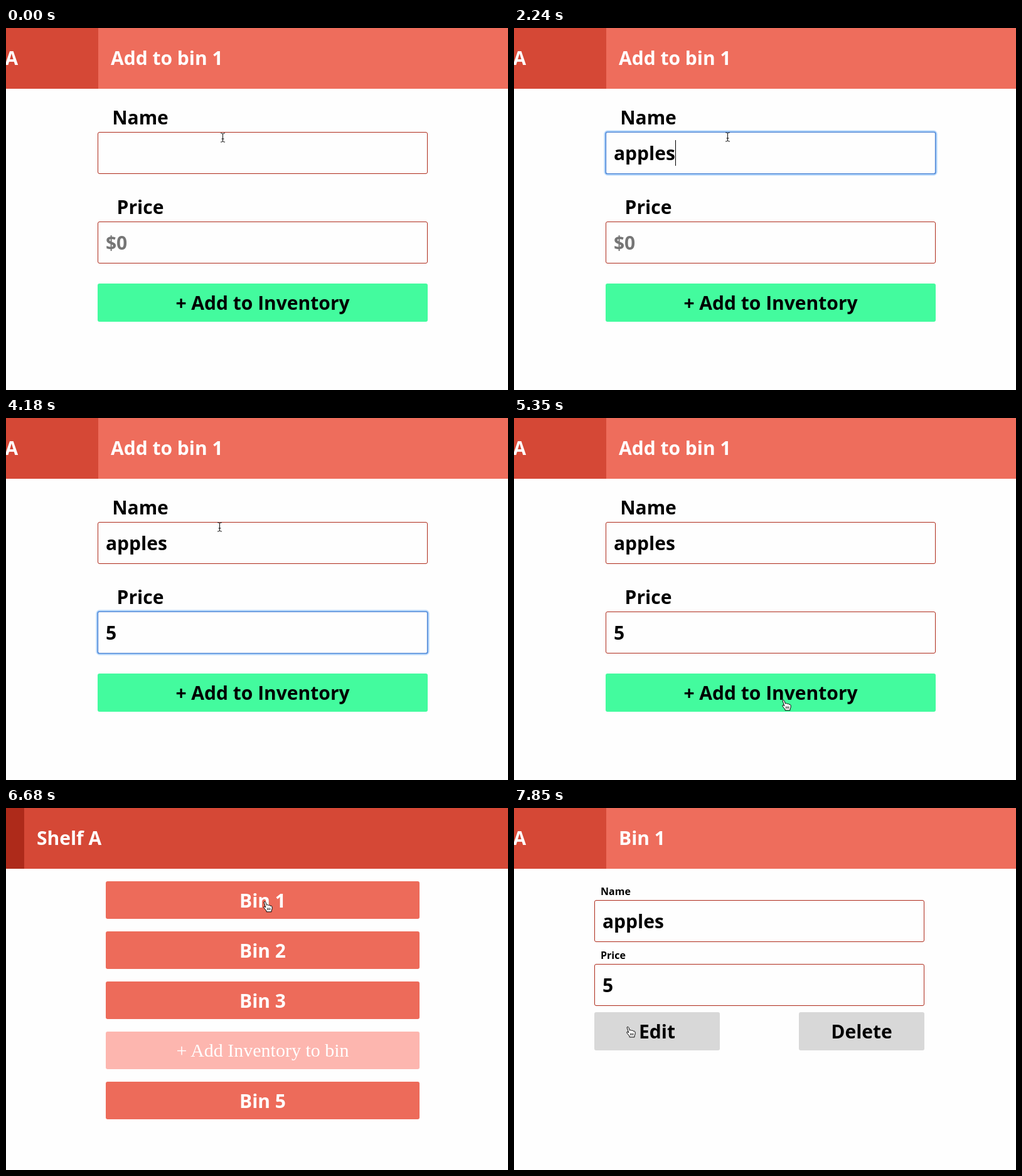
Recreate the animation shown at these times as an HTML page. Size 800 px wide and 578 px high, loop 8000 ms.

```html
<!DOCTYPE html>
<html lang="en">
<head>
<meta charset="utf-8">
<title>Shelf inventory</title>
<style>
html, body { margin: 0; width: 100%; height: 100%; overflow: hidden; background: #fefefe; }
svg { display: block; width: 800px; height: 578px; }
text { font: 700 30px "Open Sans", "Noto Sans", sans-serif; }
.small { font-size: 16px; }
.serif { font: 400 30px "Liberation Serif", serif; }
</style>
</head>
<body>
<svg id="stage" viewBox="0 0 800 578"></svg>
<script>
const LOOP = 8000;
const DARK = '#ae2a1a', RED = '#d54836', CORAL = '#ee6d5c';
const stage = document.getElementById('stage');

// Pointer samples: time, shape, hot spot x, hot spot y
const POINTER = [
  [0, 'beam', 345.5, 175], [300, 'beam', 340.5, 174],
  [4320, 'beam', 342.5, 173], [4470, 'beam', 350.5, 182], [4620, 'beam', 372.5, 226],
  [4770, 'beam', 402.5, 318], [4910, 'arrow', 420, 393], [5060, 'hand', 430, 438],
  [5200, 'hand', 432, 450], [5500, 'arrow', 432, 448],
  [5650, 'hand', 432, 444], [5790, 'arrow', 431, 424], [5940, 'hand', 428, 365],
  [6090, 'hand', 422, 282], [6230, 'hand', 418, 206], [6380, 'hand', 416, 164],
  [6530, 'hand', 415, 151], [6680, 'hand', 415, 149], [6820, 'arrow', 415, 149],
  [6970, 'arrow', 416, 152], [7120, 'arrow', 428, 186], [7260, 'arrow', 456, 262],
  [7410, 'hand', 485, 340], [7550, 'hand', 496, 375],
  [7700, 'arrow', 330, 367], [7850, 'hand', 184, 349]
];
const LETTERS = [1340, 1640, 1790, 1940, 2090, 2240];
const CARET_TOGGLES = [300, 750, 1200, 3130, 3580, 4180, 4620, 5060];
const TIMES = [...new Set([...POINTER.map(p => p[0]), ...LETTERS, ...CARET_TOGGLES,
  2540, 3730, 5350])].sort((a, b) => a - b);

const GLYPHS = {
  beam: `<path d="M-3.5-7h1.5Q0-7 0-5V5Q0 7-2 7h-1.5M3.5-7H2Q0-7 0-5M0 5Q0 7 2 7h1.5M-2 2h4"
    fill="none" stroke="#111"/>`,
  arrow: `<path d="M0 0V14.6L3.3 11.5 5.8 17.2 8.2 16.2 5.8 10.6H10.3Z" stroke="#fff" stroke-width="1.2"/>`,
  hand: `<path d="M-2 9V2Q-2.1.6-.8.5.5.6.7 2L1.5 6Q2.2 4.8 3.5 5.5L4 6.3Q5.2 5.3 6.3 6.6L6.6 7.4Q9-
    6.8 9 7Z" fill="none"/>
    <path d="M-3.8 2Q-4.2.5-2.8.4-1.7.4-1.2 1.7L.5 6.2Q1.2 5 2.7 5.7L3.4 6.6Q4.5 5.6 5.8 6.6L6.3 7.4
    Q8.4 6.5 9 8.6 9.8 12 8 14.8V16.8H0V15.2L-3 11.6Q-4.8 9.5-4 8.6-2.8 7.8-1.2 9.8Z"
    fill="#fff" stroke="#000" stroke-linejoin="round"/>
    <path d="M1.6 10.5v3.6M3.7 10.5v3.6M5.8 10.5v3.6" stroke="#000" stroke-width=".9"/>`
};
GLYPHS.hand = GLYPHS.hand.slice(GLYPHS.hand.indexOf('<path', 1));

const box = (x, y, w, h, fill, r = 0) =>
  `<rect x="${x}" y="${y}" width="${w}" height="${h}" rx="${r}" fill="${fill}"/>`;
const label = (s, x, y, { fill = '#000', anchor = 'start', cls = '' } = {}) =>
  `<text x="${x}" y="${y}" fill="${fill}" text-anchor="${anchor}" class="${cls}">${s}</text>`;
const outline = (x, y, w, h, color, width, r) =>
  `<rect x="${x}" y="${y}" width="${w}" height="${h}" rx="${r}" fill="none" stroke="${color}" stroke-width="${width}"/>`;

function button(s, x, y, w, h, fill, color = '#000', cls = '') {
  const base = y + (cls ? 40 : 42);
  return box(x, y, w, h, fill, 3) + label(s, x + w / 2, base, { fill: color, anchor: 'middle', cls });
}

function field(x, y, h, value = '', { hint = '', focused = false } = {}) {
  const frame = focused
    ? outline(x - .5, y - .5, 527, h + 1, '#d5e8fc', 5, 4) +
      outline(x, y, 526, h, '#8fbff4', 3, 3) +
      box(x + 1, y + 1, 524, h - 2, '#fefefe', 2) +
      outline(x + .5, y + .5, 525, h - 1, '#4c80d0', 1.2, 2)
    : outline(x + .5, y + .5, 525, h - 1, DARK, 1, 2.5);
  return frame + (value ? label(value, x + 13, y + 45)
    : label(hint, x + 13, y + 45, { fill: '#757575' }));
}

const binHeader = title =>
  box(0, 0, 147, 97, RED) + box(147, 0, 653, 97, CORAL) +
  label('Shelf A', -84, 59, { fill: '#fff' }) + label(title, 167, 59, { fill: '#fff' });

function addForm(t) {
  const name = 'apples'.slice(0, LETTERS.filter(k => k <= t).length);
  const price = t >= 3730 ? '5' : '';
  const onName = t >= 300 && t < 2540, onPrice = t >= 2540 && t < 5350;
  const caretOn = CARET_TOGGLES.filter(k => k <= t).length % 2 === 1;
  return binHeader('Add to bin 1') +
    label('Name', 214, 154, { anchor: 'middle' }) + field(146, 166, 67, name, { focused: onName }) +
    label('Price', 214, 297, { anchor: 'middle' }) + field(146, 309, 67, price, { hint: '$0', focused: onPrice }) +
    button('+ Add to Inventory', 146, 408, 526, 61, '#43fb9e') +
    (caretOn && (onName || onPrice) ? caret(onName ? name : price, onName ? 179 : 322) : '');
}

const ruler = document.createElement('canvas').getContext('2d');
function caret(value, y) {
  ruler.font = '700 30px "Open Sans", "Noto Sans", sans-serif';
  return box(Math.floor(159 + ruler.measureText(value).width + .2), y, 1, 41, '#000');
}

function shelf() {
  let out = box(0, 0, 29, 97, DARK) + box(29, 0, 771, 97, RED) + label('Shelf A', 49, 59, { fill: '#fff' });
  for (let i = 1; i <= 5; i++) {
    const y = 37 + 80 * i;
    out += i === 4
      ? button('+ Add Inventory to bin', 159, y, 500, 60, '#fdb6af', '#fff', 'serif')
      : button('Bin ' + i, 159, y, 500, 60, '#ed6b5a', '#fff');
  }
  return out;
}

function binPage(t) {
  const loaded = t >= 6970, h = loaded ? 67 : 26, y = 182 + h - 26 + 26;
  const small = { cls: 'small' };
  return binHeader('Bin 1') +
    label('Name', 138, 139, small) + field(128, 147, h, loaded ? 'apples' : '') +
    label('Price', 138, y - 8, small) + field(128, y, h, loaded ? '5' : '') +
    button('Edit', 128, 326, 200, 61, '#d8d8d8') + button('Delete', 454, 326, 200, 61, '#d8d8d8');
}

function pointer(t) {
  const [, shape, x, y] = POINTER.filter(p => p[0] <= t).pop();
  return `<g transform="translate(${x} ${y})">${GLYPHS[shape]}</g>`;
}

function draw(t) {
  const page = t < 5500 ? addForm : t < 6820 ? shelf : binPage;
  stage.innerHTML = page(t) + pointer(t);
}

const start = performance.now();
let shown = -1;
function tick() {
  const t = (performance.now() - start) % LOOP;
  const step = TIMES.filter(k => k <= t).pop();
  if (step !== shown) draw(shown = step);
  requestAnimationFrame(tick);
}
tick();
</script>
</body>
</html>
```
